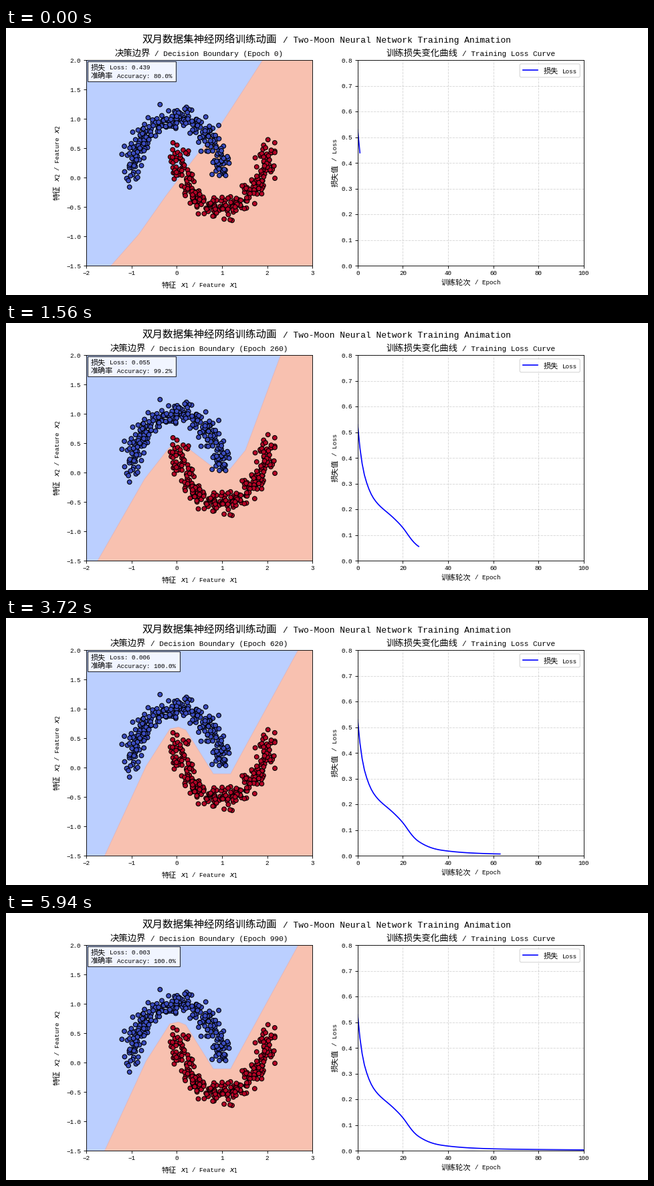
These frames come from a looping animation (960 by 400 pixels, 6000 ms). A matplotlib script:

```python
from itertools import groupby

import matplotlib.pyplot as plt
import numpy as np
from matplotlib.animation import FuncAnimation
from matplotlib.patches import FancyBboxPatch, Polygon, Rectangle
from matplotlib.transforms import Affine2D

W, H, DPI = 960, 400, 80
FRAMES, INTERVAL = 100, 60
LATIN, CJK = "Liberation Mono", "Noto Sans CJK JP"
LATIN_SCALE = 0.833  # makes a monospaced letter half an em wide
BLUE_AREA, RED_AREA, AREA_EDGE = "#bbcfff", "#f8c1b0", "#dfb4bd"

plt.rcParams.update({
    "font.family": LATIN,
    "font.size": 10 * LATIN_SCALE,
    "xtick.major.pad": 2.8,
})

# Decision boundary poses, each running from lower left to upper right
start_x = np.linspace(-2.03, 2.74, 9)
START = np.column_stack([start_x, np.interp(
    start_x, [-2.03, -.86, 0, .97, 2.74], [-2, -.99, -.05, .89, 3])])
TILT = np.array([(-2.51, -2), (-1.14, -.52), (-.18, .26), (0, .33), (.2, .33),
                 (.76, .27), (1.03, .28), (2.69, .7), (4.9, 1.77)])
BEND = np.array([(-2.12, -2), (-.71, -.11), (-.18, .41), (.04, .52),
                 (.29, .39), (.85, .06), (1.18, .06), (1.52, .38), (2.78, 3)])
FINAL = np.array([(-1.89, -2), (-.68, .02), (-.15, .66), (.04, .69),
                  (.2, .64), (.81, -.11), (1.19, -.11), (1.35, .12), (3.4, 3)])
TILT_END, BEND_END = 15, 26


def boundary(t):
    """Settle into the tilt, ease into the bend, then settle for good."""
    if t < TILT_END:
        a, b, u = START, TILT, 1 - np.exp(-t / 3)
    elif t < BEND_END:
        left_over = (BEND_END - t) / (BEND_END - TILT_END)
        a, b, u = TILT, BEND, 1 - left_over ** 2
    else:
        a, b, u = BEND, FINAL, 1 - np.exp((BEND_END - t) / 7.5)
    return a + (b - a) * u


def smooth(t, ts, vs):
    """Monotone cubic curve through falling values."""
    h = np.diff(ts)
    d = np.diff(vs) / h
    m = np.r_[d[0], 2 * d[:-1] * d[1:] / (d[:-1] + d[1:]), d[-1]]
    k = np.clip(np.searchsorted(ts, t, side="right") - 1, 0, len(h) - 1)
    u = (t - ts[k]) / h[k]
    return (vs[k] + (vs[k + 1] - vs[k]) * u * u * (3 - 2 * u)
            + h[k] * u * (1 - u) * (m[k] * (1 - u) - m[k + 1] * u))


def loss_curve():
    steps = np.array([0, 1, 3, 7, 16, 20, 27, 37, 63, 100])
    values = [.53, .439, .333, .243, .165, .128, .055, .0213, .0064, .003]
    return np.exp(smooth(np.arange(FRAMES + 1), steps, np.log(values)))


def accuracy(t):
    percent = np.interp(t, [0, TILT_END, BEND_END, 31], [80, 92.8, 99.2, 100])
    return round(percent * 5) / 5


def make_moons(n=500, noise=0.1, seed=42):
    rng = np.random.RandomState(seed)
    a = np.linspace(0, np.pi, n // 2)
    upper = np.column_stack([np.cos(a), np.sin(a)])
    lower = np.column_stack([1 - np.cos(a), 0.5 - np.sin(a)])
    order = np.arange(n)
    rng.shuffle(order)
    points = np.vstack([upper, lower])[order]
    labels = np.repeat([0, 1], n // 2)[order]
    return points + rng.normal(scale=noise, size=points.shape), labels


fig, (left, right) = plt.subplots(1, 2, figsize=(W / DPI, H / DPI), dpi=DPI)
px = Affine2D().scale(1 / W, -1 / H).translate(0, 1) + fig.transFigure


def split_runs(s, size):
    """Yield (text, font, size, width in em) for math, Latin and CJK runs."""
    for k, part in enumerate(s.split("$")):
        if k % 2:
            yield f"${part}$", LATIN, size, 1.06
            continue
        for latin, chars in groupby(part, str.isascii):
            run = "".join(chars)
            if latin:
                yield run, LATIN, size * LATIN_SCALE, len(run) / 2
            else:
                yield run, CJK, size, len(run)


def write(x, y, s, size, center=True, up=False):
    """Place mixed text with its baseline at pixel (x, y)."""
    em = size * DPI / 72
    runs = list(split_runs(s, size))
    pos = -sum(r[3] for r in runs) * em / 2 if center else 0
    texts = []
    for run, font, pts, width in runs:
        body = run.lstrip()
        off = pos + (len(run) - len(body)) * em / 2
        at = (x, y - off) if up else (x + off, y)
        texts.append(fig.text(*at, body, transform=px, family=font,
                              fontsize=pts, rotation=90 if up else 0,
                              rotation_mode="anchor", ha="left",
                              va="baseline"))
        pos += width * em
    return texts


# Left panel
left.set(xlim=(-2, 3), ylim=(-1.5, 2), facecolor=BLUE_AREA,
         xticks=range(-2, 4), yticks=np.arange(-1.5, 2.1, 0.5))
area = left.add_patch(Polygon(START, facecolor=RED_AREA, edgecolor=AREA_EDGE,
                              lw=0.7, zorder=0.5))
points, labels = make_moons()
left.scatter(*points.T, c=labels, cmap="coolwarm", s=36, edgecolors="k",
             linewidths=1)

# Right panel
right.set(xlim=(0, 100), ylim=(0, 0.8), xticks=range(0, 101, 20),
          yticks=np.arange(0, 0.81, 0.1))
right.grid(linestyle="--", alpha=0.5)
curve, = right.plot([], [], "b-", lw=1.5)
losses = loss_curve()

# Legend and info box
fig.add_artist(FancyBboxPatch((768.3, 53.8), 90, 20,
                              boxstyle="round,pad=0,rounding_size=2.2",
                              transform=px, fc="white", ec="0.8", alpha=0.8))
fig.add_artist(plt.Line2D([772.8, 795], [63, 63], color="b", lw=1.5,
                          transform=px))
info = fig.add_artist(Rectangle((122.4, 49.7), 132, 30.5, transform=px,
                                fc="white", ec="black", alpha=0.8))

write(480, 22.3, "双月数据集神经网络训练动画 / Two-Moon Neural Network "
      "Training Animation", 14)
write(695, 41.6, "训练损失变化曲线 / Training Loss Curve", 12)
write(289.3, 388.5, "特征 $x_1$ / Feature $x_1$", 10)
write(80, 202, "特征 $x_2$ / Feature $x_2$", 10, up=True)
write(695, 384.3, "训练轮次 / Epoch", 10)
write(495, 202, "损失值 / Loss", 10, up=True)
write(804, 68, "损失 Loss", 10, center=False)

live = []


def update(i):
    while live:
        live.pop().remove()
    edge = boundary(i)
    area.set_xy([*edge, (6, 3), (6, -3), (edge[0][0], -3)])
    curve.set_data(np.arange(i + 2), losses[:i + 2])

    percent = f"{accuracy(i):.1f}%"
    info.set_width(132 + 5.56 * (len(percent) - 5))
    live.extend(
        write(289.1, 41.6, f"决策边界 / Decision Boundary (Epoch {i * 10})", 12)
        + write(126.8, 62.3, f"损失 Loss: {losses[i + 1]:.3f}", 10, False)
        + write(126.8, 75.4, f"准确率 Accuracy: {percent}", 10, False))
    return area, curve, info, *live


anim = FuncAnimation(fig, update, frames=FRAMES, interval=INTERVAL,
                     repeat=True, repeat_delay=0)
plt.show()
```
